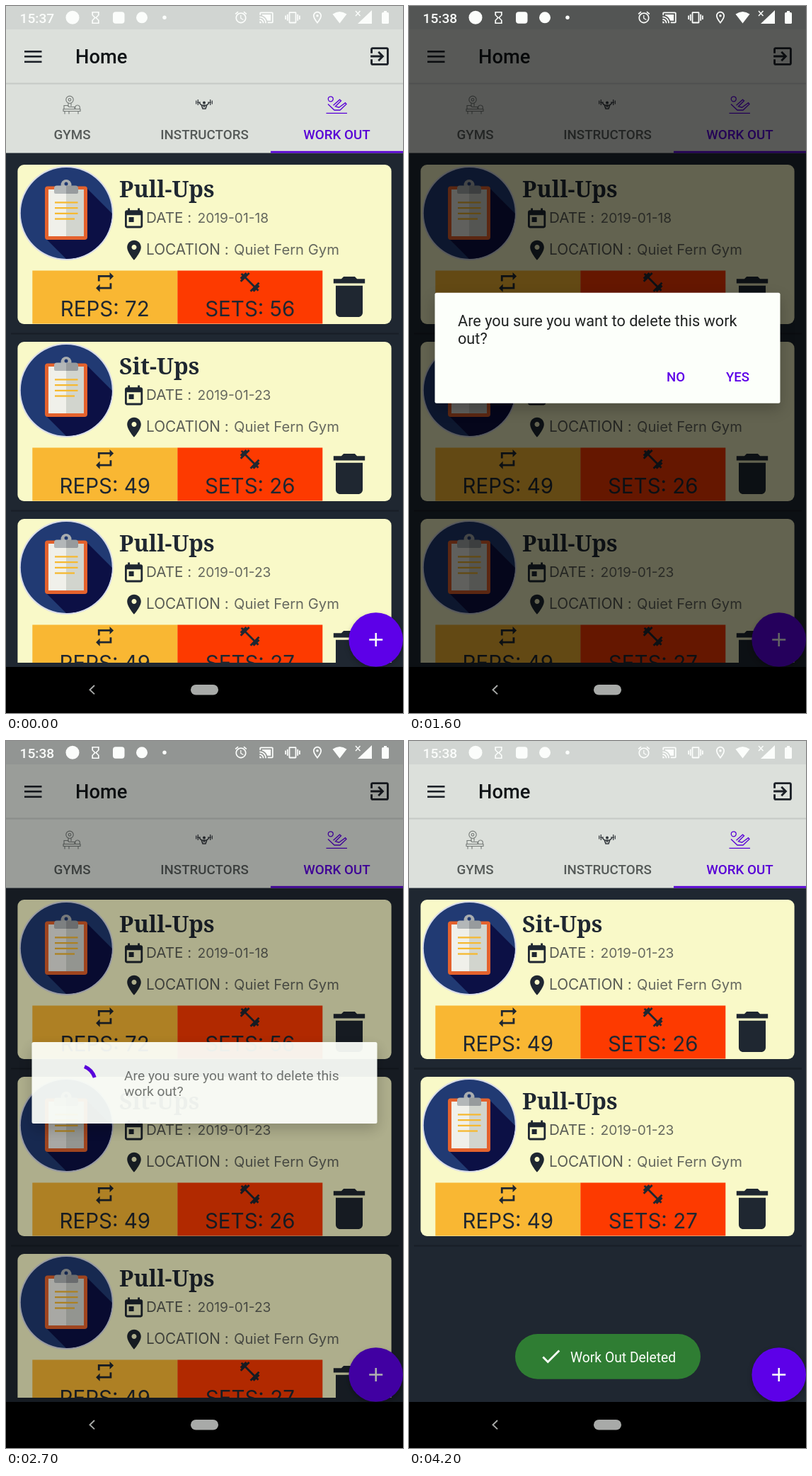
Animation of 561 by 998 pixels, one loop 4300 ms. Source, as an HTML page with a canvas:

```html
<!DOCTYPE html>
<html lang="en">
<head>
<meta charset="utf-8">
<title>Workout list</title>
<style>
html, body { margin: 0; width: 100%; height: 100%; overflow: hidden; background: #000; }
canvas { display: block; width: 561px; height: 998px; }
</style>
</head>
<body>
<canvas id="stage" width="561" height="998"></canvas>
<script>
const stage = document.getElementById('stage');
const screen2d = stage.getContext('2d');
const layer = stage.cloneNode();
const layer2d = layer.getContext('2d');
let ctx = screen2d;

const LOOP = 4300, STEP = 100, FADE = 300;
const DARK = '#1f2731', PURPLE = '#5d00e8', ACCENT = '#5800d6', BAR = '#dce0db', WHITE = '#fcfffa';
const SANS = 'Roboto, sans-serif', BODY = 'Inter, sans-serif', SERIF = '"Noto Serif", serif';

const ICONS = {
  exit: 'M10.09 15.59L11.5 17l5-5-5-5-1.41 1.41L12.67 11H3v2h9.67l-2.58 2.59zM19 3H5c-1.11 0-2 .9-2 2v4h2V5h14v14H5v-4H3v4c0 1.1.89 2 2 2h14c1.1 0 2-.9 2-2V5c0-1.1-.9-2-2-2z',
  date: 'M19 3h-1V1h-2v2H8V1H6v2H5c-1.11 0-2 .9-2 2v14c0 1.1.89 2 2 2h14c1.1 0 2-.9 2-2V5c0-1.1-.9-2-2-2zm0 16H5V8h14v11zM7 10h5v5H7z',
  place: 'M12 2C8.13 2 5 5.13 5 9c0 5.25 7 13 7 13s7-7.75 7-13c0-3.87-3.13-7-7-7zm0 9.5c-1.38 0-2.5-1.12-2.5-2.5s1.12-2.5 2.5-2.5 2.5 1.12 2.5 2.5-1.12 2.5-2.5 2.5z',
  pin: 'M12 2C8.13 2 5 5.13 5 9c0 5.25 7 13 7 13s7-7.75 7-13c0-3.87-3.13-7-7-7zM7 9c0-2.76 2.24-5 5-5s5 2.24 5 5c0 2.88-2.88 7.19-5 9.88C9.92 16.21 7 11.85 7 9zm3 0a2 2 0 1 0 4 0a2 2 0 1 0-4 0z',
  repeat: 'M7 7h10v3l4-4-4-4v3H5v6h2V7zm10 10H7v-3l-4 4 4 4v-3h12v-6h-2v4z',
  weight: 'M20.57 14.86L22 13.43 20.57 12 17 15.57 8.43 7 12 3.43 10.57 2 9.14 3.43 7.71 2 5.57 4.14 4.14 2.71 2.71 4.14l1.43 1.43L2 7.71l1.43 1.43L2 10.57 3.43 12 7 8.43 15.57 17 12 20.57 13.43 22l1.43-1.43L16.29 22l2.14-2.14 1.43 1.43 1.43-1.43-1.43-1.43L22 16.29z',
  trash: 'M6 19c0 1.1.9 2 2 2h8c1.1 0 2-.9 2-2V7H6v12zM19 4h-3.5l-1-1h-5l-1 1H5v2h14V4z',
  hourglass: 'M6 2v6l4 4-4 4v6h12v-6l-4-4 4-4V2H6zm10 14.5V20H8v-3.5l4-4 4 4zm-4-5l-4-4V4h8v3.5l-4 4z',
  alarm: 'M22 5.72l-4.6-3.86-1.29 1.53 4.6 3.86L22 5.72zM7.88 3.39L6.6 1.86 2 5.71l1.29 1.53 4.59-3.85zM12.5 8H11v6l4.75 2.85.75-1.23-4-2.37V8zM12 4c-4.97 0-9 4.03-9 9s4.02 9 9 9c4.97 0 9-4.03 9-9s-4.03-9-9-9zm0 16c-3.87 0-7-3.13-7-7s3.13-7 7-7 7 3.13 7 7-3.13 7-7 7z',
  cast: 'M1 18v3h3c0-1.66-1.34-3-3-3zm0-4v2c2.76 0 5 2.24 5 5h2c0-3.87-3.13-7-7-7zm18-7H5v1.63c3.96 1.28 7.09 4.41 8.37 8.37H19V7zM1 10v2c4.97 0 9 4.03 9 9h2c0-6.08-4.93-11-11-11zm20-7H3c-1.1 0-2 .9-2 2v3h2V5h18v14h-7v2h7c1.1 0 2-.9 2-2V5c0-1.1-.9-2-2-2z',
  vibrate: 'M0 15h2V9H0v6zm3 2h2V7H3v10zm19-8v6h2V9h-2zm-3 8h2V7h-2v10zM16.5 3h-9C6.67 3 6 3.67 6 4.5v15c0 .83.67 1.5 1.5 1.5h9c.83 0 1.5-.67 1.5-1.5v-15c0-.83-.67-1.5-1.5-1.5zM16 19H8V5h8v14z',
  check: 'M9 16.17L4.83 12l-1.42 1.41L9 19 21 7l-1.41-1.41z'
};
for (const k in ICONS) ICONS[k] = new Path2D(ICONS[k]);

const CARDS = [
  { name: 'Pull-Ups', date: '2019-01-18', reps: 72, sets: 56 },
  { name: 'Sit-Ups', date: '2019-01-23', reps: 49, sets: 26 },
  { name: 'Pull-Ups', date: '2019-01-23', reps: 49, sets: 27 }
];

const ramp = (t, from, len) => Math.min(1, Math.max(0, (t - from) / len));
const smooth = p => 0.5 - 0.5 * Math.cos(Math.PI * p);

function rect(x, y, w, h, color, r = 0) {
  ctx.fillStyle = color;
  ctx.beginPath();
  ctx.roundRect(x, y, w, h, r);
  ctx.fill();
}

function disc(x, y, r, color) {
  ctx.fillStyle = color;
  ctx.beginPath();
  ctx.arc(x, y, r, 0, 7);
  ctx.fill();
}

function text(str, x, y, font, color, align = 'left') {
  ctx.font = font;
  ctx.fillStyle = color;
  ctx.textAlign = align;
  ctx.fillText(str, x, y);
}

// Icon on a 24-unit grid, centred on x, y.
function icon(name, x, y, scale, color) {
  ctx.save();
  ctx.translate(x - 12 * scale, y - 12 * scale);
  ctx.scale(scale, scale);
  ctx.fillStyle = color;
  ctx.fill(ICONS[name], 'evenodd');
  ctx.restore();
}

function path(d, color, width) {
  ctx.strokeStyle = color;
  ctx.lineWidth = width;
  ctx.stroke(new Path2D(d));
}

function shape(d, color) {
  ctx.fillStyle = color;
  ctx.fill(new Path2D(d));
}

// Draws a group on its own layer, then blends it as one.
function faded(alpha, paint) {
  if (alpha <= 0) return;
  const back = ctx;
  ctx = layer2d;
  ctx.clearRect(0, 0, 561, 998);
  paint();
  ctx = back;
  ctx.globalAlpha = alpha;
  ctx.drawImage(layer, 0, 0);
  ctx.globalAlpha = 1;
}

function shadow(blur, dy, color) {
  ctx.shadowBlur = blur;
  ctx.shadowOffsetY = dy;
  ctx.shadowColor = color;
}

function clipboard() {
  disc(85.3, 292.5, 66.5, '#d9dce8');
  ctx.save();
  ctx.beginPath();
  ctx.arc(85.3, 292.5, 64.5, 0, 7);
  ctx.clip();
  rect(18, 225, 134, 135, '#213a73');
  shape('M113 256L180 323V400H128L56 328z', '#0c1045');
  ctx.restore();
  rect(55, 254.5, 60, 75.5, '#e4622d', 4);
  rect(60, 259, 25, 66, '#f0f0ea');
  rect(85, 259, 25, 66, '#d2d5ce');
  for (let i = 0; i < 4; i++) rect(69, 276.3 + i * 7.7, i === 3 ? 28 : 32.5, 2.3, '#f6b930');
  disc(85, 252.5, 7.5, '#a9adaf');
  rect(68, 253.5, 17, 11.5, '#b3b7b8', [4, 0, 0, 2]);
  rect(85, 253.5, 17, 11.5, '#979b9d', [0, 4, 2, 0]);
  disc(85, 251, 2.5, '#213a73');
}

function stat(x, color, glyph, label) {
  rect(x, 373.4, 205, 75, color);
  icon(glyph, x + 102.3, 389.8, 1.39, DARK);
  text(label, x + 102.5, 437.7, '29.5px ' + BODY, DARK, 'center');
}

function card(c, y) {
  ctx.save();
  ctx.translate(0, y);
  rect(16.4, 224, 528.2, 225, '#f9f9c8', 9);
  clipboard();
  text(c.name, 160, 270, 'bold 32.1px ' + SERIF, DARK);
  icon('date', 180.6, 300.8, 1.4, DARK);
  icon('place', 181, 344.8, 1.4, DARK);
  text('DATE :', 198, 306.3, '20.7px ' + BODY, '#5a5d55');
  text(c.date, 270.5, 306.3, '19.2px ' + BODY, '#66695f');
  text('LOCATION :', 198, 350.7, '20.8px ' + BODY, '#5a5d55');
  text('Quiet Fern Gym', 322, 350.7, '20.2px ' + BODY, '#66695f');
  stat(37.3, '#f9b733', 'repeat', 'REPS: ' + c.reps);
  stat(242.3, '#fd3a00', 'weight', 'SETS: ' + c.sets);
  icon('trash', 485, 410.5, 3.17, DARK);
  ctx.restore();
}

const divider = y => rect(7, y, 548, 2, '#181e27');

function list(t) {
  const shift = -250 * smooth(ramp(t, 3776, 340));
  rect(0, 207, 561, 726, DARK);
  ctx.save();
  ctx.beginPath();
  ctx.rect(0, 207, 561, 720);
  ctx.clip();
  divider(461.5);
  divider(711.5 + shift);
  divider(961.5 + shift);
  faded(1 - ramp(t, 3613, 163), () => card(CARDS[0], 0));
  card(CARDS[1], 250 + shift);
  card(CARDS[2], 500 + shift);
  ctx.restore();
}

function header() {
  rect(0, 0, 561, 33, '#d1d5d2');
  rect(0, 33, 561, 174.5, BAR);
  rect(0, 108.5, 561, 2, '#c6cac6');
  for (const y of [63, 70, 77.5]) rect(26, y, 24.5, 2.6, '#1c2128');
  text('Home', 98, 81.3, '500 27.3px ' + SANS, '#101417');
  icon('exit', 528, 71, 1.43, '#1c2128');

  const tab = '500 18.8px ' + SANS, gray = '#555a58';
  text('GYMS', 93.5, 187.5, tab, gray, 'center');
  text('INSTRUCTORS', 280.5, 187.5, tab, gray, 'center');
  text('WORK OUT', 467.5, 187.5, tab, ACCENT, 'center');
  rect(374, 204.7, 187, 2.8, ACCENT);

  path('M84.8 132.3a5.2 5.2 0 1 0 10.4 0a5.2 5.2 0 1 0-10.4 0M88.2 132.3a1.8 1.8 0 1 0 3.6 0a1.8 1.8 0 1 0-3.6 0M88 137.5v4M92 137.5v4M82 145.5v-5h5l2 2h8v3M81 145.5h24v3H81zM83 148.5v4M89 148.5v4M102 148.5v4M98 145a3.4 3.4 0 1 1 6 0', '#747976', 1.1);

  path('M270 136h5M285 136h5M268.7 133.5v5M271.3 132v8M288.7 132v8M291.3 133.5v5', '#30353a', 1.2);
  path('M273 136q2 5 7 4q5 1 7-4M276 139.5l2 5.5h4l2-5.5M278.5 142h3', '#30353a', 1.5);
  disc(280, 136.5, 2, '#30353a');

  path('M455.3 131.3a3.5 3.5 0 1 0 7 0a3.5 3.5 0 1 0-7 0M452.5 151.3h29.5M455 138.5l9 8.5h8l9-8.5l-1.5-1.8l-9 6.5l-5-1.5l8-8l-2-1.5l-9 8', ACCENT, 1.3);
}

function fab() {
  ctx.save();
  shadow(7, 3, 'rgba(0,0,0,.25)');
  disc(522.7, 894.5, 38.3, PURPLE);
  ctx.restore();
  path('M513.2 894.5h19M522.7 885v19', WHITE, 2.5);
}

function systemBars(t) {
  const w = '#fbfdfb', tone = '#a8aaa8';
  text(t < 300 ? '15:37' : '15:38', 19.5, 23.5, '500 19.2px ' + SANS, w);
  disc(94, 16.3, 9.5, w);
  icon('hourglass', 126.5, 16.5, 0.86, w);
  rect(151, 8.3, 16.5, 16.5, w, 4);
  disc(192, 16.3, 8, w);
  disc(224, 16.3, 2.7, w);
  icon('alarm', 332, 16, 0.84, w);
  icon('cast', 368, 16.3, 0.88, w);
  icon('vibrate', 405, 16.3, 0.9, w);
  icon('pin', 440, 16.3, 0.86, w);
  shape('M461.5 11.5Q471.5 4.5 481.5 11.5L471.5 24.5z', w);
  shape('M497 25L517 6V25z', w);
  path('M494 7l6.5 7M500.5 7l-6.5 7', w, 1.5);
  rect(531, 9, 10, 16, w, 1.5);
  rect(534, 7, 4, 3, w);

  rect(0, 933, 561, 65, '#000');
  path('M125 959l-6.5 6.2l6.5 6.2', tone, 1.9);
  rect(261, 958, 39, 14.5, tone, 7.2);
}

function panel(y, h) {
  ctx.save();
  shadow(20, 8, 'rgba(0,0,0,.22)');
  rect(36.5, y, 488, h, WHITE, 2.5);
  ctx.restore();
}

function confirmBox() {
  panel(404.7, 156);
  const font = '21.7px ' + SANS, button = '500 18.6px ' + SANS;
  text('Are you sure you want to delete this work', 69, 452, font, '#202322');
  text('out?', 69, 477, font, '#202322');
  text('NO', 377, 529.5, button, PURPLE, 'center');
  text('YES', 464.5, 529.5, button, PURPLE, 'center');
}

function progressBox(t) {
  panel(425, 115);
  const font = '19.25px ' + SANS;
  text('Are you sure you want to delete this', 167, 478.7, font, '#727573');
  text('work out?', 167, 501.3, font, '#727573');
  const rad = Math.PI / 180;
  const start = (-68 + (t - 2700) * 0.1686) * rad;
  const sweep = (2 + 268 * smooth((t - 2428) / 972)) * rad;
  ctx.strokeStyle = PURPLE;
  ctx.lineWidth = 5;
  ctx.beginPath();
  ctx.arc(101.7, 482.5, 24.7, start, start + sweep);
  ctx.stroke();
}

function toast() {
  rect(150, 837, 262, 63.8, '#2f7d33', 31.9);
  icon('check', 200.5, 868.5, 1.42, WHITE);
  text('Work Out Deleted', 228, 876.5, '19.3px ' + SANS, WHITE);
}

// Opacity of a dialog and of the scrim behind it.
function dialogState(t, open, close) {
  const a = ramp(t, open, FADE), b = ramp(t, close, FADE);
  return { alpha: (1 - (1 - a) ** 4) * (1 - b) ** 3, dim: 0.6 * a * (1 - b) };
}

function draw(t) {
  const ask = dialogState(t, 1200, 2200);
  const busy = dialogState(t, 2550, 3400);
  const dim = Math.max(ask.dim, busy.dim);
  list(t);
  header();
  fab();
  rect(0, 0, 561, 933, `rgba(0,0,0,${dim})`);
  faded(ask.alpha, confirmBox);
  faded(busy.alpha, () => progressBox(t));
  faded(ramp(t, 3680, FADE), toast);
  systemBars(t);
}

const begin = performance.now();
function tick() {
  const t = (performance.now() - begin) % LOOP;
  draw(Math.floor(t / STEP) * STEP);
  requestAnimationFrame(tick);
}
tick();
</script>
</body>
</html>
```
